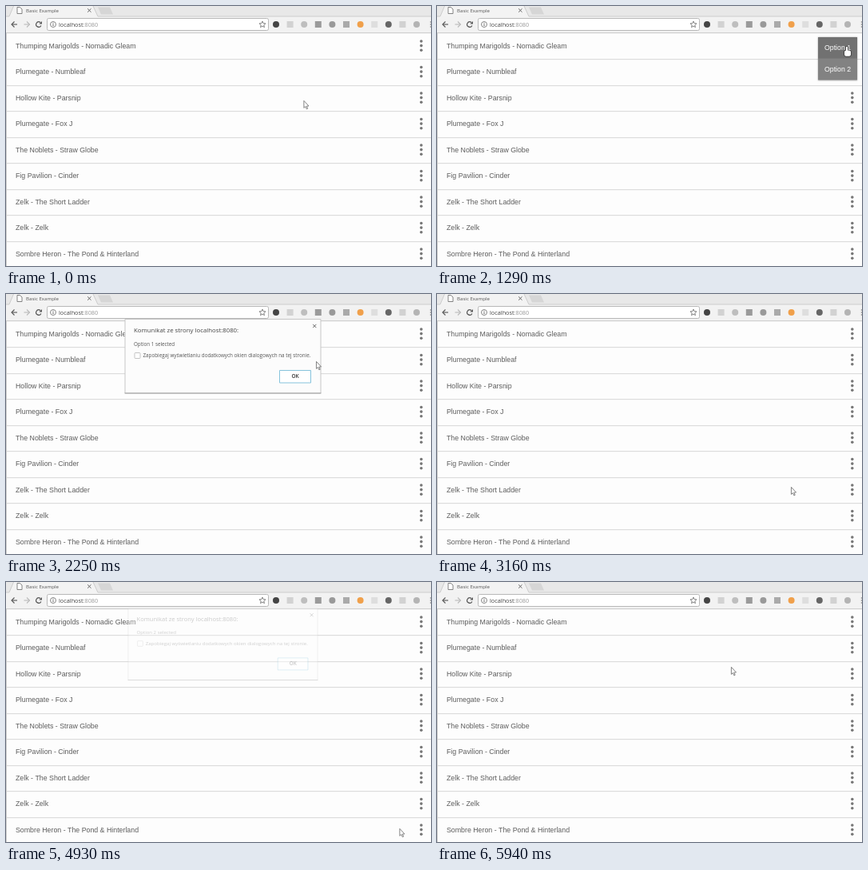
An HTML page with a canvas for the animation above (6260 ms loop, 532 px wide and 325 px high).

```html
<!DOCTYPE html>
<html lang="en">
<head>
<meta charset="utf-8">
<title>Basic Example</title>
<style>
html, body { margin: 0; width: 100%; height: 100%; overflow: hidden; background: #fdfdfd; }
canvas { display: block; width: 532px; height: 325px; }
</style>
</head>
<body>
<canvas id="stage" width="532" height="325"></canvas>
<script>
const ctx = document.getElementById('stage').getContext('2d');
const LOOP = 6260;
const STEP = 77.47;
const FIRST_STEP = 130;
const ROW = 32.5;
const ARIAL = '"Liberation Sans", Arial, sans-serif';
const UI = '"Open Sans", "Noto Sans", sans-serif';

const albums = [
  'Thumping Marigolds - Nomadic Gleam',
  'Plumegate - Numbleaf',
  'Hollow Kite - Parsnip',
  'Plumegate - Fox J',
  'The Noblets - Straw Globe',
  'Fig Pavilion - Cinder',
  'Zelk - The Short Ladder',
  'Zelk - Zelk',
  'Sombre Heron - The Pond & Hinterland'
];
const iconColors = ['#444', '#d2d2d2', '#bebebe', '#9a9a9a', '#999', '#aaa',
  '#f0a04b', '#dedede', '#666', '#d2d2d2', '#b4b4b4'];

// Each round: open a menu, hover an option, pick it, confirm the dialog
const rounds = [
  { open: 1050, hover: 1250, pick: 1745, ok: 2640, y: 39, option: 0 },
  { open: 3990, hover: 4270, pick: 4920, ok: 5640, y: 267, option: 1 }
];
const HAND_LEAD = 310;

const home = { x: 372.5, y: 118 };
const okButton = { x: 362, y: 103 };
const moves = [
  { from: 130, to: 700, x: 513, y: 50.5 },
  { from: 1690, to: 2222, x: 388, y: 84 },
  { from: 2222, to: 2470, ...okButton },
  { from: 2780, to: 3151, x: 443, y: 241 },
  { from: 3151, to: 3640, x: 516, y: 309.5 },
  { from: 4860, to: 4933, x: 492.5, y: 308 },
  { from: 4933, to: 5420, ...okButton },
  { from: 5700, to: 5940, x: 368, y: 106 }
];

const clamp = v => Math.max(0, Math.min(1, v));
const ramp = (t, from, to) => clamp((t - from) / (to - from));
const snap = t => Math.max(0, FIRST_STEP + STEP * Math.floor((t - FIRST_STEP) / STEP + 0.06));

function pointerAt(t) {
  let { x, y } = home;
  for (const m of moves) {
    const k = ramp(t, m.from, m.to);
    x += (m.x - x) * k;
    y += (m.y - y) * k;
  }
  return [x, y];
}

function rect(x, y, w, h, color) {
  ctx.fillStyle = color;
  ctx.fillRect(x, y, w, h);
}

function disc(x, y, r, color) {
  ctx.fillStyle = color;
  ctx.beginPath();
  ctx.arc(x, y, r, 0, 7);
  ctx.fill();
}

function arc(x, y, r, from, to, color, width) {
  ctx.beginPath();
  ctx.arc(x, y, r, from, to);
  ctx.strokeStyle = color;
  ctx.lineWidth = width;
  ctx.stroke();
}

function shape(points, fill, stroke, width = 1, close = true) {
  ctx.beginPath();
  for (let i = 0; i < points.length; i += 2) ctx.lineTo(points[i], points[i + 1]);
  if (close) ctx.closePath();
  if (fill) { ctx.fillStyle = fill; ctx.fill(); }
  if (stroke) { ctx.strokeStyle = stroke; ctx.lineWidth = width; ctx.stroke(); }
}

const line = (points, color, width = 1) => shape(points, null, color, width, false);

function box(x, y, w, h, r, fill, stroke) {
  ctx.beginPath();
  ctx.roundRect(x, y, w, h, r);
  ctx.fillStyle = fill;
  ctx.fill();
  ctx.strokeStyle = stroke;
  ctx.lineWidth = 1;
  ctx.stroke();
}

function text(str, x, y, size, color, family = UI, weight = 400) {
  ctx.font = `${weight} ${size}px ${family}`;
  ctx.fillStyle = color;
  ctx.fillText(str, x, y);
}

function cross(x, y, r, color) {
  line([x - r, y - r, x + r, y + r], color);
  line([x + r, y - r, x - r, y + r], color);
}

function star(x, y, r) {
  const points = [];
  for (let i = 0; i < 10; i++) {
    const a = i * Math.PI / 5 - Math.PI / 2, d = i % 2 ? r * 0.45 : r;
    points.push(x + d * Math.cos(a), y + d * Math.sin(a));
  }
  shape(points, null, '#666', 0.8);
}

function navArrow(x, dir, color) {
  const tip = x + 3.5 * dir;
  line([x - 3.5 * dir, 23, tip, 23], color, 1.1);
  line([x, 19.5, tip, 23, x, 26.5], color, 1.1);
}

function drawTabs() {
  rect(0, 0, 532, 34, '#f2f2f2');
  rect(0, 0, 532, 13, '#e8e8e8');
  shape([4, 13.5, 9.5, 0, 109, 0, 115, 13.5], '#f3f3f3');
  line([0, 13, 4, 13, 9.5, 0], '#c4c4c4', 0.8);
  line([109, 0, 115, 13, 532, 13], '#c4c4c4', 0.8);
  shape([115, 1.5, 130, 1.5, 134, 10.5, 119, 10.5], '#d6d6d6');
  shape([14, 1.5, 17.5, 1.5, 20, 4, 20, 9.5, 14, 9.5], '#fff', '#777', 0.9);
  text('Basic Example', 25, 8, 6.15, '#555');
  cross(104.3, 5.5, 2.2, '#666');
}

function drawToolbar() {
  navArrow(10.5, -1, '#555');
  navArrow(26, 1, '#bbb');
  arc(41, 23, 3.3, 0.5, 5.4, '#555', 1.2);
  shape([45, 19, 45, 22.6, 41.4, 22.6], '#555');

  box(51.5, 15.5, 277, 15, 2, '#fff', '#b8b8b8');
  arc(59, 23, 3.5, 0, 7, '#666', 0.8);
  rect(58.5, 22.5, 1, 2.5, '#666');
  rect(58.5, 20.8, 1, 1, '#666');
  text('localhost', 66, 25.8, 7.3, '#444');
  text(':8080', 66 + ctx.measureText('localhost').width, 25.8, 7.3, '#999');
  star(321, 23.2, 4.2);

  iconColors.forEach((color, i) => {
    const x = 338 + i * 17.6;
    if (i % 2) rect(x - 4, 19, 8, 8, color);
    else disc(x, 23, 4, color);
  });
  for (let i = -1; i < 2; i++) disc(531.5, 23 + i * 3, 0.8, '#888');
}

function drawList() {
  rect(0, 33, 532, 292, '#fdfdfd');
  rect(0, 33, 532, 1.2, '#cfcfcf');
  rect(0, 34, 1, 291, '#ccc');
  albums.forEach((name, i) => {
    const y = 49.6 + i * ROW;
    text(name, 12, y + 3.2, 8.8, '#5c5c5c', ARIAL);
    for (let d = -1; d < 2; d++) disc(519.8, y + d * 5.6, 1.8, '#777');
    rect(1, Math.round(66 + i * ROW), 531, 1.2, '#dcdcdc');
  });
}

function drawMenu({ open, hover, pick, y, option }, t) {
  if (t < open || t >= pick) return;
  ctx.save();
  ctx.shadowColor = 'rgba(0,0,0,.35)';
  ctx.shadowBlur = 2;
  rect(477, y, 49, 53.5, '#828282');
  ctx.restore();
  rect(477, y + option * 27, 49, 26.5, `rgba(92,92,92,${ramp(t, hover, hover + 90)})`);
  for (let i = 0; i < 2; i++) text('Option ' + (i + 1), 485, y + 15.8 + i * 27, 8.75, '#fff', ARIAL);
}

function drawDialog({ pick, ok, option }, t) {
  const alpha = ramp(t, pick - 27, pick + 123) * (1 - ramp(t, ok, ok + 150));
  if (!alpha) return;
  const scale = 0.956 + 0.044 * alpha;
  ctx.save();
  ctx.globalAlpha = alpha;
  ctx.translate(271.5, 78);
  ctx.scale(scale, scale);
  ctx.translate(-271.5, -78);
  box(149, 31.5, 245, 92.5, 0, '#fcfcfc', '#c6c6c6');
  line([148.5, 124, 394.5, 124], '#a0a0a0');
  text('Komunikat ze strony localhost:8080:', 160, 48.3, 7.8, '#444');
  cross(386.3, 40, 2.1, '#666');
  text(`Option ${option + 1} selected`, 160, 64.5, 6.25, '#555');
  box(161, 73.5, 7, 7, 1, '#fff', '#c4c4c4');
  text('Zapobiegaj wyświetlaniu dodatkowych okien dialogowych na tej stronie.', 171.5, 79, 6.3, '#555');
  box(342.5, 95.5, 39, 15.5, 0, '#fff', '#86c3dc');
  text('OK', 357.5, 105.3, 6.5, '#333', UI, 600);
  ctx.restore();
}

function drawHand() {
  ctx.beginPath();
  ctx.roundRect(-1.1, 0.3, 2.2, 8, 1);
  ctx.roundRect(-3, 5, 8, 7.3, 2);
  ctx.strokeStyle = '#333';
  ctx.lineWidth = 1.4;
  ctx.stroke();
  ctx.fillStyle = '#fff';
  ctx.fill();
}

function drawPointer(t) {
  ctx.save();
  ctx.translate(...pointerAt(t));
  if (rounds.some(r => t >= r.open - HAND_LEAD && t < r.pick)) drawHand();
  else shape([0.4, 0.4, 0.4, 9.4, 2.4, 7.6, 3.8, 10.8, 5.2, 10.2, 3.8, 7.1, 6.5, 7], '#fff', '#777', 0.9);
  ctx.restore();
}

function draw(now) {
  const t = snap(now % LOOP);
  drawTabs();
  drawToolbar();
  drawList();
  for (const round of rounds) {
    drawMenu(round, t);
    drawDialog(round, t);
  }
  drawPointer(t);
}

const start = performance.now();
function tick() {
  draw(performance.now() - start);
  requestAnimationFrame(tick);
}
tick();
</script>
</body>
</html>
```
